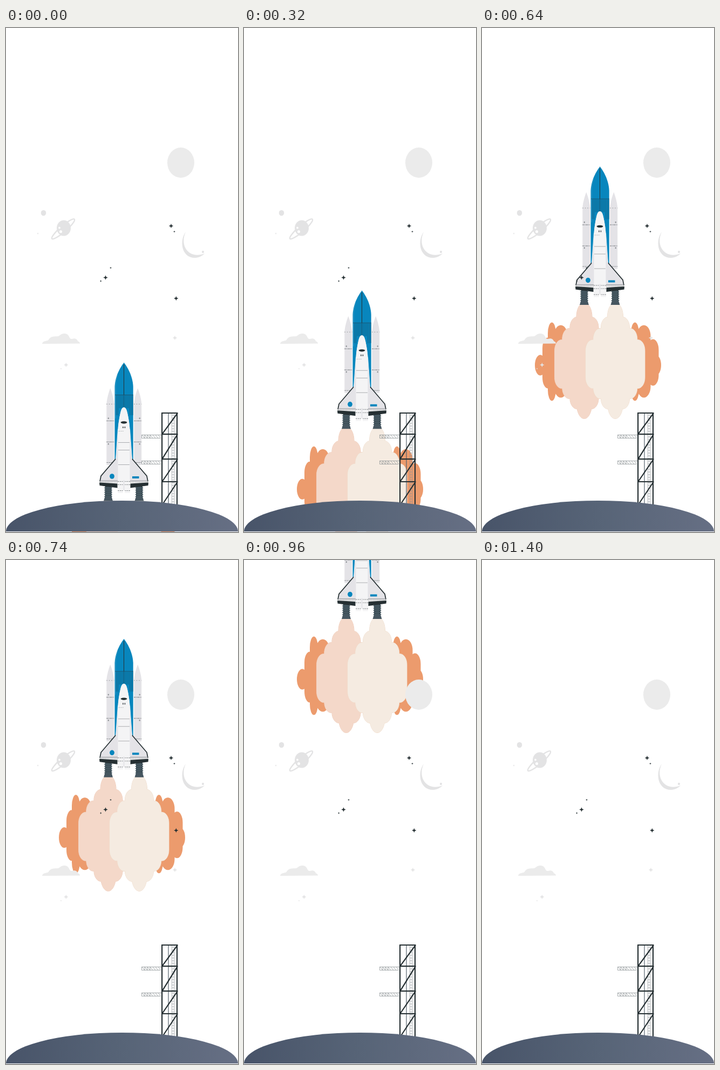
Write an HTML page with a canvas that moves like this. It is 430x932 px and loops after 6.02 s.

```html
<!DOCTYPE html>
<html lang="en">
<head>
<meta charset="utf-8">
<title>Lift-off</title>
<style>
  html, body { margin: 0; width: 100%; height: 100%; overflow: hidden; background: #fff; }
  canvas { display: block; width: 100%; height: 100%; }
</style>
</head>
<body>
<canvas id="stage" width="430" height="932"></canvas>
<script>
const g = document.getElementById('stage').getContext('2d');
const LOOP = 6020, FLIGHT = 1400, STEP = 20, CLIMB = 1090;
const INK = '#263033', BLUE = '#0886bd', PALE = '#e4e3e7', WHITE = '#f4f4f5';
const MIST = '#ebebeb', HAZE = '#e3e3e4', SEAM = '#8b8f92', FIRE = '#ec9b6d';

const cubic = (a, b, s) => 3 * a * s * (1 - s) ** 2 + 3 * b * s * s * (1 - s) + s ** 3;

function ease(u) {
  let lo = 0, hi = 1;
  for (let i = 0; i < 24; i++) {
    const mid = (lo + hi) / 2;
    if (cubic(.686, .52, mid) < u) lo = mid; else hi = mid;
  }
  return cubic(.293, .746, lo);
}

function shape(d, fill, stroke, width = 1) {
  const p = new Path2D(d);
  if (fill) { g.fillStyle = fill; g.fill(p); }
  if (stroke) { g.strokeStyle = stroke; g.lineWidth = width; g.stroke(p); }
}

function line(d, color, width) {
  shape(d, null, color, width);
}

function dashes(x, w, y, on, off) {
  g.setLineDash([on, off]);
  line(`M${x} ${y}h${w}`, '#74797c', .8);
  g.setLineDash([]);
}

function box(x, y, w, h, fill) {
  g.fillStyle = fill;
  g.fillRect(x, y, w, h);
}

function oval(x, y, rx, ry, fill) {
  g.fillStyle = fill;
  g.beginPath();
  g.ellipse(x, y, rx, ry, 0, 0, 7);
  g.fill();
}

function mirrored(cx, paint) {
  paint();
  g.save();
  g.translate(2 * cx, 0);
  g.scale(-1, 1);
  paint();
  g.restore();
}

function star(x, y, r, fill) {
  const k = r * .27;
  shape(`M${x} ${y - r}l${k} ${r - k}l${r - k} ${k}l${k - r} ${k}l${-k} ${r - k}` +
        `l${-k} ${k - r}l${k - r} ${-k}l${r - k} ${-k}Z`, fill);
}

// upright lobe with rounded ends
function lobe(path, x, y, rx, ry) {
  path.roundRect(x - rx, y - ry, 2 * rx, 2 * ry, { x: Math.min(rx, 13), y: Math.min(ry, 20) });
}

function fire(x) {
  const p = new Path2D();
  lobe(p, x - 30, 986, 10, 19);
  lobe(p, x - 16, 982, 10, 47);
  lobe(p, x - 8.5, 979.5, 7.5, 72.5);
  lobe(p, x + 8, 979, 12.5, 67);
  lobe(p, x + 25, 981, 10.5, 43);
  lobe(p, x + 30, 986, 10, 19);
  g.fillStyle = FIRE;
  g.fill(p);
}

function puff(x, fill, edge) {
  const p = new Path2D();
  for (let i = 0; i < 3; i++) lobe(p, x, 984 - i, 55 - 14.2 * i, 45 + 20 * i);
  p.addPath(new Path2D(`M${x - 7} 874h14c5 4 8 15 7.5 26v160c-2 17 -8 25 -14.5 25` +
    `s-12.5 -8 -14.5 -25v-160c-.5 -11 2.5 -22 7.5 -26Z`));
  g.strokeStyle = edge;
  g.lineWidth = 1;
  g.stroke(p);
  g.fillStyle = fill;
  g.fill(p);
}

function nozzle(x) {
  box(x - 6, 846, 12, 26, '#37474f');
  for (let y = 849; y < 870; y += 4) oval(x, y + 1.5, 7.5, 1.7, '#465861');
  shape(`M${x - 6} 867h12l2.5 7.5h-17Z`, '#465660');
}

function booster(x, mark) {
  shape(`M${x} 666c3 8 6 18 7 28v114h-14v-114c1 -10 4 -20 7 -28Z`, PALE);
  dashes(x - 7, 14, 695.5, 1.5, 3);
  dashes(x - 7, 14, 803.5, 3, 1);
  for (const y of [726.5, 765.5]) {
    line(`M${x - 7} ${y}h14`, SEAM, .8);
    dashes(x - 7, 14, y, 2, 5);
  }
  for (const y of [720.5, 768]) box(x + mark, y, 2, 2.5, SEAM);
}

function tank() {
  mirrored(218.6, () => shape('M218.7 618.5C213 626 202.5 642 201.5 663V800H218.7Z', BLUE));
  line('M206.5 642C203.8 650 203 657 203 664V722', '#4ca4ca', .7);
  line('M218.5 622V704', INK, 1);
  line('M202 678.5H236', '#1d4f66', .8);
  for (let x = 204.5; x < 236; x += 2.8)
    line(`M${x} 679V${Math.abs(x - 218.5) > 9 ? 716 : 703}`, '#17526d', .7);
}

function wing() {
  shape('M208 793L203.5 797L176 829L174 839H207V855H218V793Z', PALE);
  line('M203.5 796.5L176 828.5L174 838.5', INK, 1.7);
  for (let x = 175; x < 207; x += 2.4) line(`M${x} 837.5v4`, '#777b7f', .6);
  line('M174 837H207', SEAM, .7);
  shape('M173 840.5L206.5 842.5V850.5L173.5 846Z', INK);
}

function hull() {
  const nose = 'M218.6 701.5C215 701.5 213.4 706 212 712C210 721 208 732 207.5 742';
  shape(nose + 'L203.5 798L208 835H218.6Z', PALE);
  shape(nose + 'V836H218.6Z', WHITE);
  line('M207.5 742L203.5 797', '#fff', .8);
  box(207, 835, 10, 25, WHITE);
  for (const y of [838.5, 844.5, 855.5]) dashes(207, 10, y, 3, 1);
}

function orbiter() {
  mirrored(218.5, wing);
  box(217, 836, 3, 18, '#e9e9ec');
  mirrored(218.5, hull);
  box(218, 703, 1, 132, WHITE);
  shape('M212.5 729C214 726.8 223 726.8 224.5 729C224 732.5 213 732.5 212.5 729Z', INK);
  for (const x of [216, 219.5]) box(x, 737, 1.8, 3, '#565c60');
  dashes(209, 9, 745.5, 1, 1.5);
  for (const y of [766.5, 780.5, 807.5]) line(`M208 ${y}h21`, SEAM, .7);
  oval(196.5, 829, 4.4, 4.8, BLUE);
  box(234, 829, 12.5, 4, BLUE);
}

function rocket() {
  fire(138);
  fire(292);
  puff(189.5, '#f4d8c9', '#efcbb8');
  puff(247, '#f5ebe1', '#efd8c5');
  nozzle(189.5);
  nozzle(247);
  booster(193.3, -4.5);
  booster(244.2, 2.5);
  tank();
  orbiter();
}

function saturn() {
  g.strokeStyle = HAZE;
  g.lineWidth = 2.4;
  g.beginPath();
  g.ellipse(106, 371.7, 27.5, 5.5, -.71, 0, 7);
  g.stroke();
  oval(107, 370, 13, 14.5, HAZE);
  oval(99, 369.5, 1.8, 2, '#fff');
  oval(101.5, 376.5, 2.5, 2.6, '#fff');
}

function sky() {
  oval(324, 249, 25, 28, MIST);
  oval(69.5, 342, 4.8, 5.2, HAZE);
  saturn();
  shape('M333 377C321 393 325 425 350 425C358 425 364 421 368 417C340 428 321 404 333 377Z', HAZE);
  oval(365, 414, 2, 2.2, HAZE);
  shape('M67 584C68 579 73 579 77 578C80 577 80 572 86 571C91 569 96 572 100 568C105 564 113 564 116 569C118 572 118 575 122 575C129 573 132 576 133 579C136 580 137 582 137 583.5Z', MIST);
  star(306, 366, 4.3, INK);
  star(312, 376.5, 2, INK);
  star(194, 443.5, 2, INK);
  star(184.5, 461.5, 4.3, INK);
  star(175.7, 468, 2, INK);
  star(315.3, 500, 4.3, INK);
  star(313, 573, 4.3, HAZE);
  star(111.3, 623, 4.3, HAZE);
  star(102, 630, 1.6, HAZE);
  star(59, 380, 2, HAZE);
}

function arm(y) {
  let d = `M251.5 ${y}h36.5M251.5 ${y + 6}h34.5M251.5 ${y}v6`;
  for (let x = 252; x < 284; x += 5) d += `M${x} ${y}l5 6${x < 267 ? 'v-6' : ''}`;
  line(d, '#858b8f', .7);
}

function tower() {
  arm(752.5);
  arm(800.5);
  let ladder = 'M307.5 713V882M311.8 713V882';
  for (let y = 716; y < 882; y += 5) ladder += `M307.5 ${y}h4.3`;
  line(ladder, '#8b9195', .7);
  line('M301 712V882', '#55616c', 1.2);
  let frame = 'M289.1 711V884M317 711V884';
  const decks = [712, 751.2, 797.2, 839, 882];
  for (let i = 0; i < 4; i++)
    frame += `M288 ${decks[i]}h30.5M318 ${decks[i]}L290 ${decks[i + 1] - 1}`;
  line(frame, INK, 2.2);
}

const soil = g.createLinearGradient(0, 0, 430, 0);
soil.addColorStop(0, '#485469');
soil.addColorStop(.5, '#576477');
soil.addColorStop(1, '#666f84');

function draw(t) {
  box(0, 0, 430, 932, '#fff');
  if (t < FLIGHT) {
    g.save();
    g.translate(0, -CLIMB * ease(t / FLIGHT));
    rocket();
    g.restore();
  }
  sky();
  tower();
  g.save();
  g.beginPath();
  g.rect(0, 870, 430, 61);
  g.clip();
  oval(215, 931, 215, 57, soil);
  g.restore();
}

const start = performance.now();
function tick() {
  const t = (performance.now() - start) % LOOP;
  draw(Math.floor(t / STEP) * STEP);
  requestAnimationFrame(tick);
}
tick();
</script>
</body>
</html>
```
